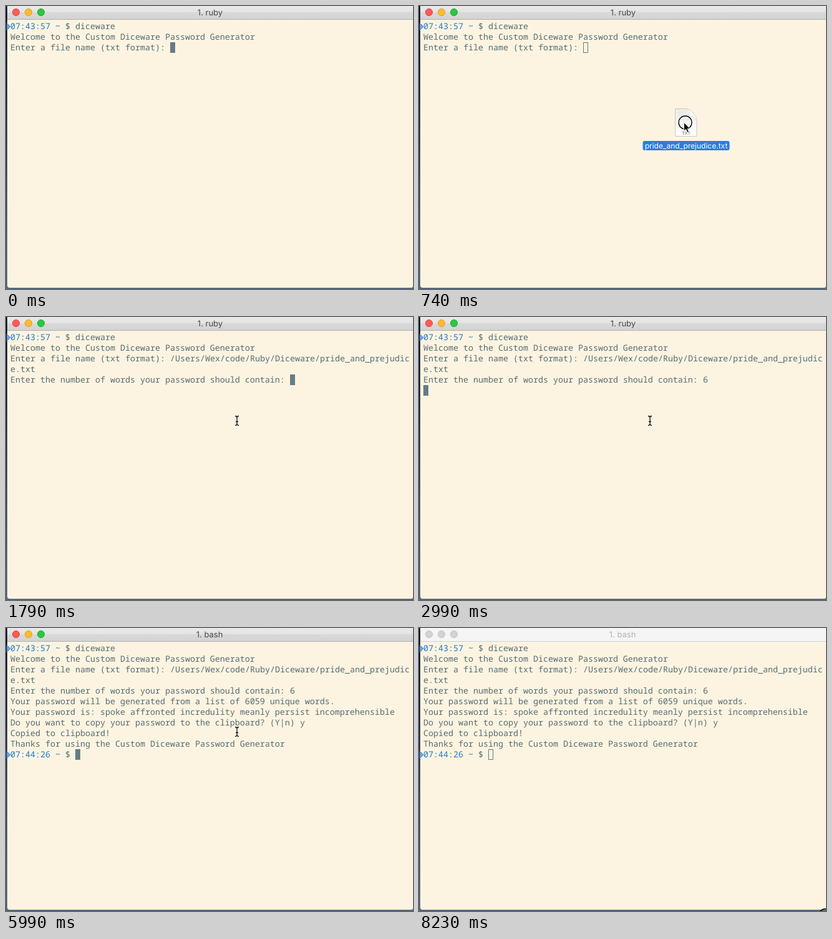
These frames come from a looping animation (652x453 px, 8.33 s). An HTML page:

```html
<!DOCTYPE html>
<html lang="en">
<head>
<meta charset="utf-8">
<title>Terminal session</title>
<style>
  html, body { margin: 0; width: 100%; height: 100%; overflow: hidden; background: #3c5065; }
  svg { display: block; width: 652px; height: 453px; }
  text { white-space: pre; text-rendering: geometricPrecision; }
  #lines { font: 13.3333px "Noto Sans Mono", monospace; fill: #586c75; }
  .blue { fill: #2178cb; }
  .title { font: 13px Inter, sans-serif; text-anchor: middle; fill: #484848; }
  .idle .title { fill: #b3b3b3; }
  .label { font: 12px Inter, sans-serif; text-anchor: middle; fill: #fff; }
  .kind { font: 7px Inter, sans-serif; text-anchor: middle; fill: #666; }
</style>
</head>
<body>
<svg viewBox="0 0 652 453">
  <defs>
    <linearGradient id="desk" x2="0" y2="1">
      <stop stop-color="#0b1428"/><stop offset=".3" stop-color="#1c2a42"/>
      <stop offset=".65" stop-color="#3d5068"/><stop offset="1" stop-color="#536a7f"/>
    </linearGradient>
    <linearGradient id="bar" x2="0" y2="1">
      <stop stop-color="#e9e9e9"/><stop offset=".48" stop-color="#e4e4e4"/>
      <stop offset=".5" stop-color="#d9d9d9"/><stop offset="1" stop-color="#d3d3d3"/>
    </linearGradient>
    <linearGradient id="paper" x2="0" y2="1">
      <stop stop-color="#ececea"/><stop offset="1" stop-color="#fff"/>
    </linearGradient>
    <path id="mark" d="M1.5 27.5 L7 33 L1.5 38.5 Z" fill="#75a8e4" stroke="#3f7fc9"/>
  </defs>

  <rect width="652" height="453" fill="url(#desk)"/>
  <path d="M2 0H652V448Q652 451 649 451H6Q2 451 2 447Z" fill="#fcf4e0"/>

  <g id="active">
    <path d="M2 21V3Q2 0 5 0H652V21Z" fill="url(#bar)"/>
    <path d="M2 21.5H652" stroke="#b1b1b1"/>
    <g stroke-width="1">
      <circle cx="16" cy="10" r="5.6" fill="#fc5b57" stroke="#df4744"/>
      <circle cx="36" cy="10" r="5.6" fill="#fdbb2f" stroke="#dea034"/>
      <circle cx="56" cy="10" r="5.6" fill="#29c840" stroke="#27a935"/>
    </g>
    <text id="ruby" class="title" x="327" y="15">1. ruby</text>
    <text id="bash" class="title" x="326" y="15">1. bash</text>
  </g>
  <g id="inactive" class="idle">
    <path d="M2 21V3Q2 0 5 0H652V21Z" fill="#f5f5f5"/>
    <path d="M2 21.5H652" stroke="#d2d2d2"/>
    <g fill="#d2d2d2" stroke="#c4c4c4">
      <circle cx="16" cy="10" r="5.6"/><circle cx="36" cy="10" r="5.6"/><circle cx="56" cy="10" r="5.6"/>
    </g>
    <text class="title" x="326" y="15">1. bash</text>
    <circle cx="651" cy="460" r="10.5" fill="none" stroke="#000" stroke-width="1.3"/>
  </g>

  <use href="#mark"/>
  <use id="mark2" href="#mark" y="170"/>
  <g id="lines"></g>
  <rect id="cursor" x=".5" y=".5" width="7" height="16" stroke="#667c86"/>

  <g id="file">
    <path d="M410.5 164.5H428Q434 165 439 171Q445 177 445 184V208.5H410.5Z" fill="url(#paper)" stroke="#c9c8c2"/>
    <path d="M414 170h14M414 174h18M414 178h12M414 182h20M414 190h16M414 194h22" stroke="#dededb"/>
    <path d="M428 164.5Q434 169 433 176Q440 175 445 184Q445 177 439 171Q434 165 428 164.5Z" fill="#fafafa" stroke="#cfcfca" stroke-width=".7"/>
    <text class="kind" x="428" y="206">TXT</text>
    <rect x="358.5" y="216" width="139" height="15" rx="3" fill="#307cdd"/>
    <text class="label" x="428" y="228">pride_and_prejudice.txt</text>
    <circle cx="426.5" cy="186.5" r="10.5" fill="none" stroke="#000" stroke-width="1.3"/>
    <path d="M424.5 186.5V200L427.6 197.2L430 202.5L432.3 201.5L430 196.4H434.2Z" fill="#000" stroke="#fff" stroke-width=".8"/>
  </g>

  <g id="beam" fill="none">
    <path d="M367 158.5Q370 158.5 370 161Q370 158.5 373 158.5M370 161V171M367 173.5Q370 173.5 370 171Q370 173.5 373 173.5M368 167.5H372" stroke="#fff" stroke-opacity=".7" stroke-width="2.4"/>
    <path d="M367 158.5Q370 158.5 370 161Q370 158.5 373 158.5M370 161V171M367 173.5Q370 173.5 370 171Q370 173.5 373 173.5M368 167.5H372" stroke="#111" stroke-width="1.3"/>
  </g>
</svg>
<script>
const LOOP = 8330;
const byId = id => document.getElementById(id);

// Each step is [time, style]; a style holds until the next step.
function play(el, steps) {
  const frames = steps.map(([time, style]) => ({ offset: time / LOOP, easing: "step-end", ...style }));
  frames.push({ ...frames[frames.length - 1], offset: 1 });
  el.animate(frames, { duration: LOOP, iterations: Infinity }).startTime = 0;
}

function showBetween(el, from, to = LOOP) {
  const steps = [[from, { visibility: "visible" }]];
  if (from > 0) steps.unshift([0, { visibility: "hidden" }]);
  if (to < LOOP) steps.push([to, { visibility: "hidden" }]);
  play(el, steps);
}

const move = (x, y) => ({ transform: `translate(${x}px, ${y}px)` });

// Terminal grid: 8 x 17 px cells starting at (7, 24).
const cellX = col => 7 + col * 8;
const cellY = row => 24 + row * 17;

function addText(time, row, col, content, className = "") {
  const el = document.createElementNS("http://www.w3.org/2000/svg", "text");
  el.setAttribute("x", cellX(col));
  el.setAttribute("y", cellY(row) + 13);
  el.setAttribute("class", className);
  el.textContent = content;
  byId("lines").append(el);
  if (time) showBetween(el, time);
}

[
  [0, 0, 0, "07:43:57 ~", "blue"],
  [0, 0, 11, "$ diceware"],
  [0, 1, 0, "Welcome to the Custom Diceware Password Generator"],
  [0, 2, 0, "Enter a file name (txt format):"],
  [1040, 2, 32, "/Users/Wex/code/Ruby/Diceware/pride_and_prejudic"],
  [1040, 3, 0, "e.txt"],
  [1790, 4, 0, "Enter the number of words your password should contain:"],
  [2540, 4, 56, "6"],
  [3140, 5, 0, "Your password will be generated from a list of 6059 unique words."],
  [3140, 6, 0, "Your password is: spoke affronted incredulity meanly persist incomprehensible"],
  [3140, 7, 0, "Do you want to copy your password to the clipboard? (Y|n)"],
  [4190, 7, 58, "y"],
  [4940, 8, 0, "Copied to clipboard!"],
  [4940, 9, 0, "Thanks for using the Custom Diceware Password Generator"],
  [4940, 10, 0, "07:44:26 ~", "blue"],
  [4940, 10, 11, "$"],
].forEach(line => addText(...line));

const SOLID = "#667c86", HOLLOW = "transparent";
play(byId("cursor"), [
  [0, 2, 32, SOLID],
  [290, 2, 32, HOLLOW],
  [1040, 3, 6, SOLID],
  [1790, 4, 56, SOLID],
  [2540, 4, 57, SOLID],
  [2990, 5, 0, SOLID],
  [3140, 7, 58, SOLID],
  [4190, 7, 59, SOLID],
  [4940, 10, 13, SOLID],
  [8230, 10, 13, HOLLOW],
].map(([time, row, col, fill]) => [time, { ...move(cellX(col), cellY(row)), fill }]));

showBetween(byId("file"), 440, 1040);
play(byId("file"), [
  [0, move(225, 101)], [590, move(154, 44)], [740, move(0, 0)], [890, move(-58, -25)],
]);

showBetween(byId("beam"), 1040, 7780);
play(byId("beam"), [
  [0, move(0, 0)], [7340, move(32, 10)], [7490, move(238, 144)], [7630, move(276, 229)],
]);

showBetween(byId("mark2"), 4940);
showBetween(byId("ruby"), 0, 5990);
showBetween(byId("bash"), 5990, 8230);
showBetween(byId("inactive"), 8230);
</script>
</body>
</html>
```
